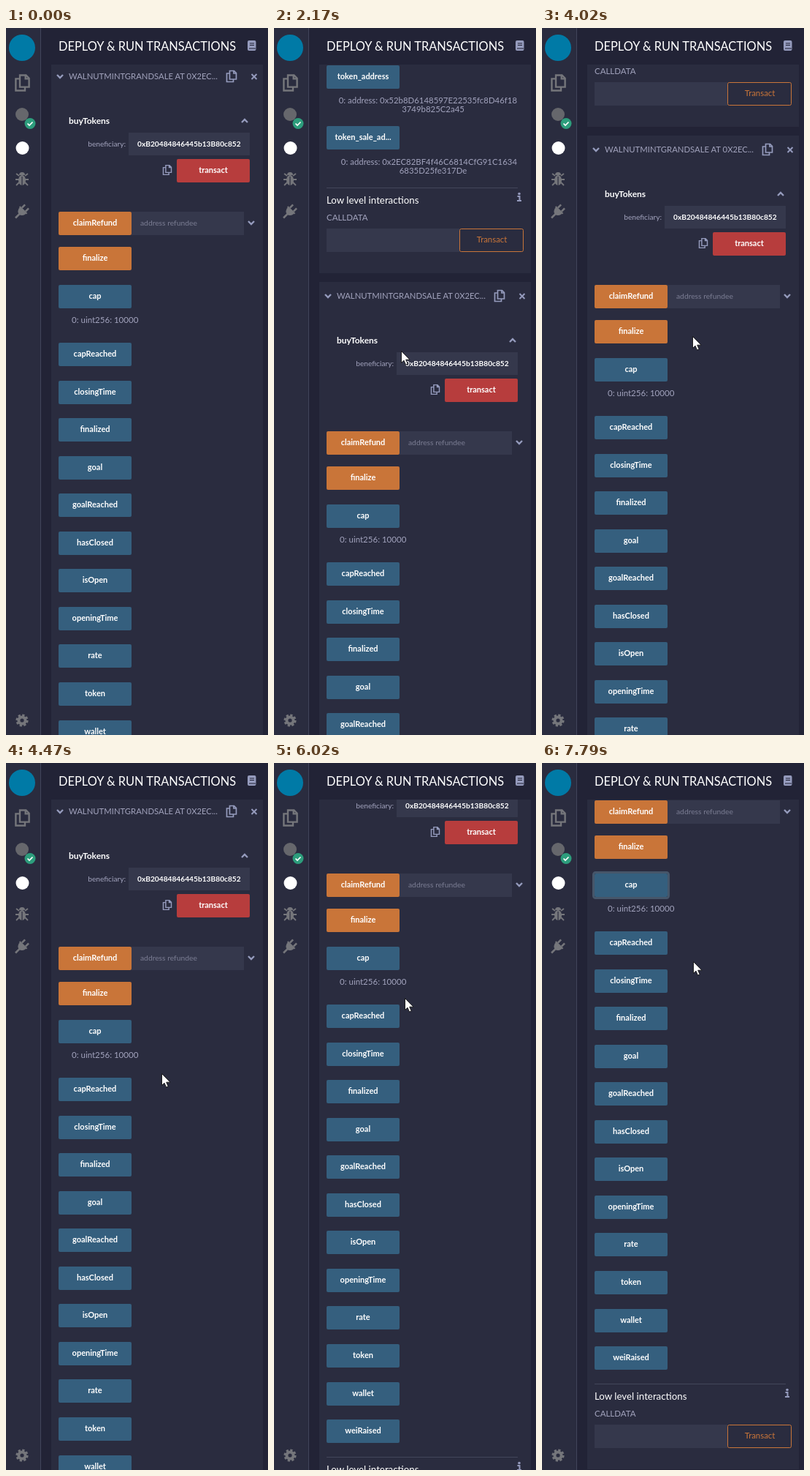
Animation, 359 px wide and 966 px high, one loop 8000 ms. Source, as an HTML page:

```html
<!DOCTYPE html>
<html lang="en">
<head>
<meta charset="utf-8">
<style>
html, body { margin: 0; width: 100%; height: 100%; overflow: hidden; background: #222336; }
svg { display: block; font-family: Lato, "Open Sans", sans-serif; }
.b { font-weight: 700; }
.mid { text-anchor: middle; }
.end { text-anchor: end; }
</style>
</head>
<body>
<svg id="stage" width="359" height="966"></svg>
<script>
const BLUE = '#355f7e', ORANGE = '#c97539', RED = '#b73d3d', PANEL = '#2a2c3f',
  FIELD = '#35384c', DIM = '#a2a3bd', ICON = '#959bbd', GREY = '#75767b';

const rect = (x, y, w, h, fill, more = '') =>
  `<rect x="${x}" y="${y}" width="${w}" height="${h}" fill="${fill}" ${more}/>`;
const line = (d, color, width, more = '') =>
  `<path d="${d}" fill="none" stroke="${color}" stroke-width="${width}" ${more}/>`;
const disc = (x, y, r, fill) => `<circle cx="${x}" cy="${y}" r="${r}" fill="${fill}"/>`;
const at = (x, y, body, more = '') => `<g transform="translate(${x} ${y}) ${more}">${body}</g>`;
// y is the middle of the capitals
const text = (x, y, s, size, fill, cls = '') =>
  `<text x="${x}" y="${y + size * .36}" font-size="${size}" fill="${fill}" class="${cls}">${s}</text>`;

const button = (x, y, s, fill) =>
  rect(x, y, 100, 32, fill, 'rx="2"') + text(x + 50, y + 15, s, 11, '#fff', 'b mid');
const chevron = (x, y, dir) =>
  line(`M${x - 4} ${y - 2 * dir}l4 ${4 * dir}l4 ${-4 * dir}`, ICON, 2.4);
const copy = (x, y, k, color) => at(x, y, line(
  'M-2.5-7.5H3.5L6.5-4.5V4H-2.5ZM3-7V-4H6M-3-4H-6.5V7.5H2.5V4.5', color, 1.7), `scale(${k})`);
const info = (x, y) => disc(x, y - 4.5, 1.8, ICON) +
  line(`M${x - 2.5} ${y - 1}h3v6m-3.5 0h6`, ICON, 2);

function lowLevel(y) {
  return rect(72, y, 262, 1, '#43465a') + text(72, y + 17, 'Low level interactions', 13.3, '#fff') +
    info(336, y + 13) + text(72, y + 41, 'CALLDATA', 11.5, DIM) +
    rect(72, y + 56, 182, 32, FIELD) +
    rect(254.5, y + 56.5, 87, 31, PANEL, `rx="2" stroke="${ORANGE}"`) +
    text(298.5, y + 71, 'Transact', 11.4, ORANGE, 'mid');
}

const result = (y, first, second) =>
  text(333, y, '0: address: ' + first, 11.4, DIM, 'end') + text(218, y + 12, second, 11.4, DIM, 'mid');

const calls = ['capReached', 'closingTime', 'finalized', 'goal', 'goalReached', 'hasClosed',
  'isOpen', 'openingTime', 'rate', 'token', 'wallet', 'weiRaised'];

const list =
  rect(62, -400, 290, 435, PANEL) +
  button(72, -249, 'token_address', BLUE) +
  result(-201, '0x52b8D6148597E22535fc8D46f18', '3749b825C2a45') +
  button(72, -166, 'token_sale_ad...', BLUE) +
  result(-117, '0x2EC82BF4f46C6814CfG91C1634', '6835D25fe317De') +
  lowLevel(-82) +
  rect(62, 47, 290, 1118, PANEL) +
  chevron(74, 66, 1) +
  text(86, 66, 'WALNUTMINTGRANDSALE AT 0X2EC...', 11.3, DIM) +
  copy(309, 66, 1, ICON) + line('M336.5 63l7 7m0-7l-7 7', ICON, 2) +
  text(86, 127, 'buyTokens', 12, '#fff', 'b') + chevron(327, 127, -1) +
  text(164, 158, 'beneficiary:', 10.2, DIM, 'end') + rect(168, 143, 166, 31, FIELD) +
  `<svg x="168" y="143" width="154" height="31">${
    text(12, 15, '0xB20484846445b13B80c852', 10.2, '#fff', 'b')}</svg>` +
  copy(221, 194, .85, ICON) + button(234, 179, 'transact', RED) +
  rect(172, 251, 154, 32, FIELD) + button(72, 251, 'claimRefund', ORANGE) +
  text(184, 266, 'address refundee', 10.3, '#7b7d93') + chevron(336, 266, 1) +
  button(72, 299, 'finalize', ORANGE) +
  rect(70.5, 349.5, 103, 35, 'none', 'id="ring" rx="3" stroke="#46566a" stroke-width="3"') +
  button(72, 351, 'cap', BLUE) + text(90, 399, '0: uint256: 10000', 11.5, DIM) +
  calls.map((s, i) => button(72, Math.round(430 + 51.55 * i), s, BLUE)).join('') +
  lowLevel(1048);

const bug = line('M-4-4l-4-3M4-4l4-3M-9 1H9M-4 5l-4 4M4 5l4 4', GREY, 1.8) +
  `<ellipse cy="2" rx="5" ry="7" fill="${GREY}"/>` +
  `<path d="M-4-5a4 4 0 0 1 8 0z" fill="${GREY}"/>` + line('M0-3V9', PANEL, 1.2);
const plug = line('M-3.5-10v6M3.5-10v6M0 4v8', GREY, 2.6) +
  `<path d="M-7-4H7v2H6a6 7 0 0 1-12 0H-7z" fill="${GREY}"/>`;
const gear = `<circle r="4.6" fill="none" stroke="${GREY}" stroke-width="4"/>` +
  `<circle r="7.2" fill="none" stroke="${GREY}" stroke-width="2.8" stroke-dasharray="3.2 2.455"/>`;

const sidebar = rect(0, 0, 47, 966, PANEL) + rect(47, 0, 1, 966, '#41445a') +
  disc(22, 27, 18, '#007aa6') + copy(22.5, 75, 1.4, GREY) +
  disc(22, 118, 9, '#66676c') + disc(33, 130.5, 7.5, '#2d9d7c') +
  line('M29.5 130.5l2.5 2.5l4.5-4.5', '#fff', 1.7) +
  disc(22.5, 164, 9, '#fff') +
  at(22, 206, bug) + at(21.5, 251, plug, 'rotate(45)') + at(22, 946, gear);

const header = text(72, 25, 'DEPLOY &amp; RUN TRANSACTIONS', 16.4, '#fff') +
  rect(331, 17, 11.5, 14, ICON, 'rx="2"') +
  line('M334 21h6m-6 2.5h6M333 28h9', '#222336', 1.2);

const stage = document.getElementById('stage');
stage.innerHTML = `<clipPath id="view">${rect(48, 50, 311, 916, '#000')}</clipPath>
  <g clip-path="url(#view)"><g id="list">${list}</g></g>${header}${sidebar}
  <g id="cursor"><path id="arrow" d="M.5.5V16.5L4 13.2L6.5 19L9.2 17.8L6.7 12.2H12Z"
    fill="#fff" stroke="#111" stroke-width=".9"/>
  ${line('M-3-8h6M0-8V8M-3 8h6', '#8d8e9a', 1, 'id="beam"')}</g>`;
const [listEl, ring, cursor, arrow, beam] =
  ['list', 'ring', 'cursor', 'arrow', 'beam'].map(id => document.getElementById(id));

// each burst of activity advances in steps of STEP ms
const STEP = 67.5;
const bursts = [0, 790, 1670, 2500, 3130, 3940, 4200, 5140, 5950, 6770, 7580];

const scrollKeys = [[750, 0], [1010, -100], [1250, -200], [1500, -300], [3687.5, -300],
  [3877.5, -200], [3930, -200], [4005, -100], [4150, -100], [4400, 0], [5288, 0], [5478, 100],
  [7040, 100], [7230, 200]];
const cursorKeys = [[1000, 318, 560], [1400, 304, 489], [1640, 304, 489], [1800, 302, 470],
  [1950, 240, 454], [2140, 174, 441], [2215, 174, 441], [2400, 160, 441], [2460, 160, 441],
  [2960, 158, 364], [3100, 158, 364], [3680, 206, 421], [4150, 206, 421], [4400, 213, 424],
  [4600, 213, 424], [4930, 240, 372], [5120, 240, 372], [5400, 250, 336], [5470, 250, 336],
  [5870, 199, 342], [5920, 199, 342], [6200, 126, 266], [6400, 126, 266], [6680, 199, 349],
  [6740, 199, 349], [6900, 210, 346], [7040, 210, 346], [7490, 208, 300], [7540, 208, 300],
  [7780, 207, 271]];

function sample(keys, t) {
  const i = keys.findIndex(k => k[0] > t);
  if (i < 0) return keys[keys.length - 1].slice(1);
  if (i === 0) return keys[0].slice(1);
  const a = keys[i - 1], b = keys[i], u = (t - a[0]) / (b[0] - a[0]), e = u * u * (3 - 2 * u);
  return a.slice(1).map((v, j) => v + (b[j + 1] - v) * e);
}

function draw(now) {
  const time = now % 8000;
  const start = bursts.filter(b => b <= time).pop();
  const t = start + Math.floor((time - start) / STEP) * STEP;
  const scroll = Math.round(sample(scrollKeys, t)[0]);
  const [x, y] = sample(cursorKeys, t).map(Math.round);
  const inField = x > 168 && x < 334 && y + scroll > 143 && y + scroll < 174;
  listEl.setAttribute('transform', `translate(0 ${-scroll})`);
  cursor.setAttribute('transform', `translate(${x} ${y})`);
  cursor.style.display = t < 1000 ? 'none' : '';
  arrow.style.display = inField ? 'none' : '';
  beam.style.display = inField ? '' : 'none';
  ring.style.display = t < 6270 ? 'none' : '';
  requestAnimationFrame(draw);
}
draw(performance.now());
</script>
</body>
</html>
```
